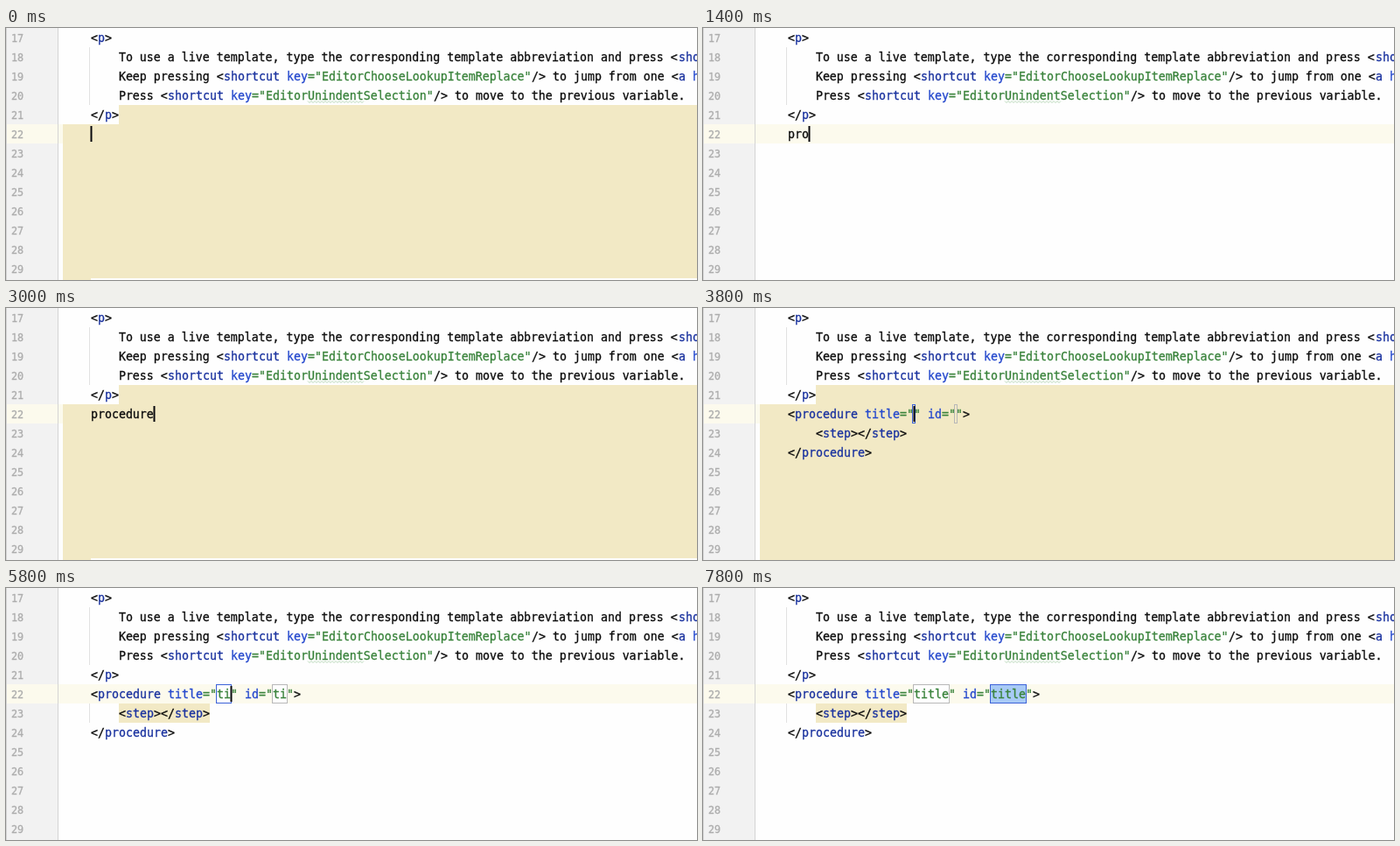
Recreate the animation shown at these times as an HTML page with a canvas. Size 790x288 px, loop 8 s.

```html
<!DOCTYPE html>
<html lang="en">
<head>
<meta charset="utf-8">
<title>Live template</title>
<style>
  html, body { margin: 0; width: 100%; height: 100%; overflow: hidden; background: #fefefe; }
  canvas { display: block; }
</style>
</head>
<body>
<canvas id="stage" width="790" height="288"></canvas>
<script>
const ctx = document.getElementById('stage').getContext('2d');
const WIDTH = 790, HEIGHT = 288, LOOP = 8000;
const ROW = 22, CHAR = 8, LEFT = 65, FIRST_LINE = 17, EDIT_LINE = 22, BASELINE = 16;
const FAMILY = '"DejaVu Sans Mono", monospace';
const CODE_FONT = `${CHAR / 0.602}px ${FAMILY}`;
const NUMBER_FONT = `11.8px ${FAMILY}`;

const color = {
  page: '#fefefe', gutter: '#f2f2f2', edge: '#d4d4d4', number: '#adadad',
  caretRow: '#fcfaed', block: '#f2e9c5', guide: '#e2e2e2',
  ink: '#0c0c0c', tag: '#1a329f', attr: '#2448cd', string: '#38823a',
  wave: '#bcdabc', active: '#3c62d8', idle: '#b8b8b8', selected: '#a8caf6'
};

const intro = [
  '    <p>',
  '        To use a live template, type the corresponding template abbreviation and press <shortcut',
  '        Keep pressing <shortcut key="EditorChooseLookupItemReplace"/> to jump from one <a href="#">',
  '        Press <shortcut key="EditorUnindentSelection"/> to move to the previous variable.',
  '    </p>'
];

// [start time, text]
const abbreviation = [
  [0, ''], [1000, 'p'], [1200, 'pr'], [1400, 'pro'], [1800, 'proc'],
  [2000, 'proce'], [2200, 'proced'], [2400, 'procedur'], [2600, 'procedure']
];
const titles = [[0, ''], [5800, 'ti'], [6000, 'titl'], [6200, 'title']];
const EXPAND = 3800, NEXT_FIELD = 7200;

const within = (t, from, to) => t >= from && t < to;
const valueAt = (steps, t) => steps.filter(([start]) => start <= t).pop()[1];
const rowTop = line => (line - FIRST_LINE) * ROW;
const colX = col => LEFT + col * CHAR;

function fill(x, y, w, h, style) {
  ctx.fillStyle = style;
  ctx.fillRect(x, y, w, h);
}

// A hairline outline gives the letters a medium weight.
function drawText(text, x, line, style) {
  const y = rowTop(line) + BASELINE;
  ctx.fillStyle = ctx.strokeStyle = style;
  ctx.lineWidth = 0.3;
  ctx.fillText(text, x, y);
  ctx.strokeText(text, x, y);
}

// Splits markup so that odd pieces are tags, attributes or values.
function drawCode(line, text) {
  const pieces = text.split(/((?<=<\/?)\w+|\w+(?==")|="[^"]*")/);
  let col = 0;
  ctx.font = CODE_FONT;
  pieces.forEach((piece, i) => {
    const followed = (pieces[i + 2] || '').startsWith('=') && pieces[i + 1] === '';
    const style = i % 2 === 0 ? color.ink
      : piece.startsWith('=') ? color.string
      : followed ? color.attr : color.tag;
    drawText(piece, colX(col), line, style);
    col += piece.length;
  });
}

function drawField(col, length, border, background) {
  const pad = length ? 0.5 : 1.5;
  const x = colX(col) - pad, w = length * CHAR + pad * 2, y = rowTop(EDIT_LINE) + 0.5;
  if (background) fill(x, y, w, 21, background);
  ctx.strokeStyle = border;
  ctx.lineWidth = 1;
  ctx.strokeRect(x, y, w, 21);
}

function drawCaret(col) {
  fill(colX(col) - 0.5, rowTop(EDIT_LINE) + 2, 2, 18, '#08080c');
}

function drawGuide(line, rows) {
  fill(95, rowTop(line), 1, rows * ROW, color.guide);
}

function drawWave(col, length, y) {
  ctx.beginPath();
  for (let x = 0; x <= length * CHAR; x += 2) {
    ctx.lineTo(colX(col) + x, y + (x % 4 ? 1 : -1));
  }
  ctx.strokeStyle = color.wave;
  ctx.lineWidth = 1;
  ctx.stroke();
}

function drawBlock(bottom) {
  const top = rowTop(EDIT_LINE);
  fill(129, top - ROW, WIDTH - 129, ROW, color.block);
  fill(LEFT, top, WIDTH - LEFT, bottom - top, color.block);
  fill(LEFT, bottom, 32, HEIGHT - bottom, color.block);
}

function drawBackground() {
  fill(0, 0, WIDTH, HEIGHT, color.page);
  fill(0, 0, 59, HEIGHT, color.gutter);
  fill(0, rowTop(EDIT_LINE), WIDTH, ROW, color.caretRow);
  fill(59, 0, 1, HEIGHT, color.edge);
  fill(0, 0, 1, HEIGHT, color.edge);
  ctx.font = NUMBER_FONT;
  for (let line = FIRST_LINE; line < 30; line++) {
    drawText(line, 6, line, color.number);
  }
}

function drawTemplate(t) {
  const title = valueAt(titles, t);
  const titleCol = 22, idCol = titleCol + title.length + 6;
  const onId = t >= NEXT_FIELD;
  if (t >= 4000) {
    drawGuide(23, 1);
    fill(129, rowTop(23), 104, ROW, color.block);
  }
  const blank = title && '#fefefe';
  drawField(titleCol, title.length, onId ? color.idle : color.active, blank);
  drawField(idCol, title.length, onId ? color.active : color.idle, onId ? color.selected : blank);
  drawCode(22, `    <procedure title="${title}" id="${title}">`);
  drawCode(23, '        <step></step>');
  drawCode(24, '    </procedure>');
  const hidden = within(t, 4800, 5200) || t >= 7800;
  if (!hidden) drawCaret((onId ? idCol : titleCol) + title.length);
}

function draw(t) {
  drawBackground();
  if (within(t, 0, 400) || within(t, 1800, 4000)) drawBlock(t < EXPAND ? 286 : HEIGHT);
  drawGuide(18, 3);
  intro.forEach((text, i) => drawCode(FIRST_LINE + i, text));
  drawWave(35, 8, 84.5);
  if (t < EXPAND) {
    const typed = valueAt(abbreviation, t);
    drawCode(EDIT_LINE, '    ' + typed);
    drawCaret(4 + typed.length);
  } else {
    drawTemplate(t);
  }
}

const start = performance.now();
function tick() {
  draw((performance.now() - start) % LOOP);
  requestAnimationFrame(tick);
}
tick();
</script>
</body>
</html>
```
